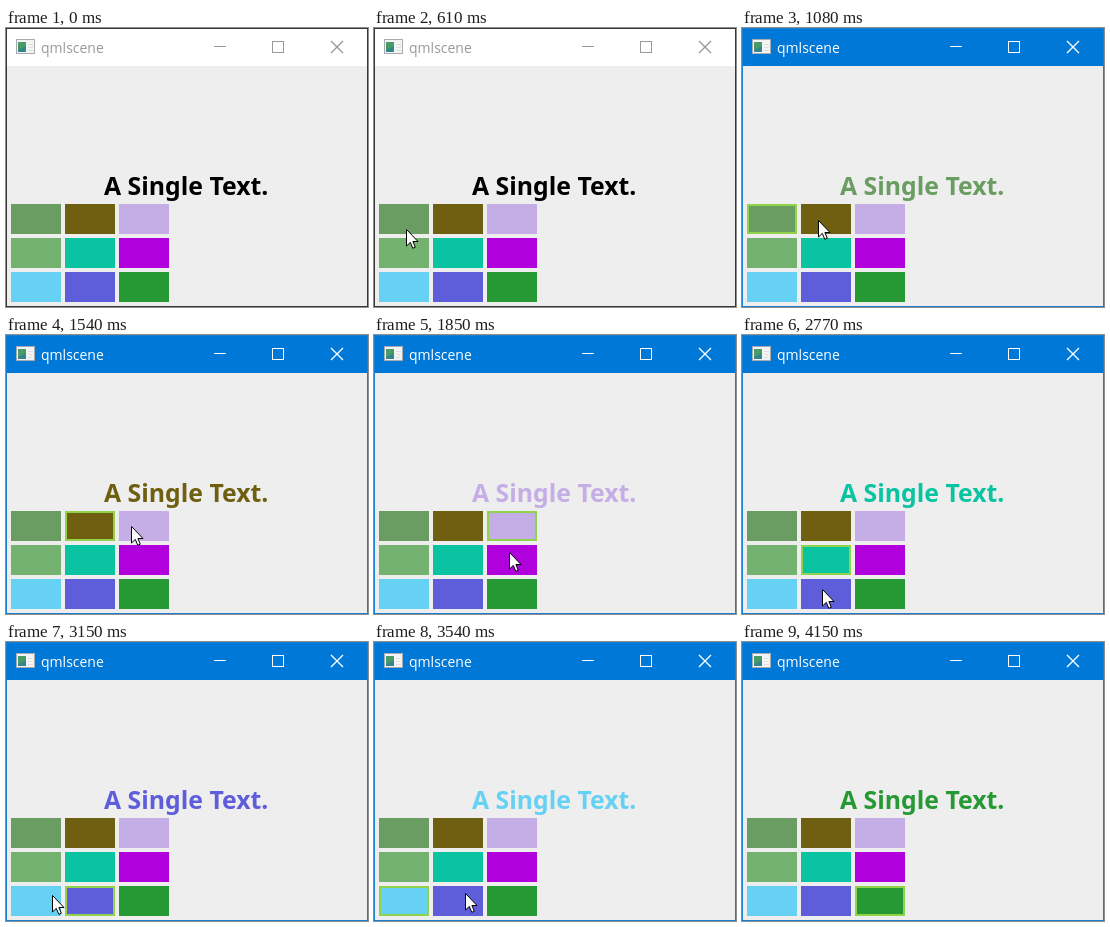
Write an HTML page that moves like this. It is 362 px wide and 279 px high and loops after 4.38 s.

```html
<!DOCTYPE html>
<html>
<head>
<meta charset="utf-8">
<style>
  html, body { margin: 0; height: 100%; overflow: hidden; background: #eee; }
  svg { display: block; }
  #window { --bar: #fff; --ink: #999; --edge: #383838; }
  #window.active { --bar: #0078d7; --ink: #fff; --edge: #1a7fd0; }
  #bar { fill: var(--bar); }
  #title { font: 14px "Open Sans", sans-serif; fill: var(--ink); }
  #buttons { fill: none; stroke: var(--ink); }
  #edge { fill: none; stroke: var(--edge); }
  #label { font: bold 24.8px "Noto Sans", sans-serif; text-anchor: middle; }
  #frame { fill: none; stroke: #90d34b; stroke-width: 2; }
</style>
</head>
<body>
<svg id="window" width="362" height="279">
  <rect width="362" height="279" fill="#eee"/>
  <rect id="bar" width="362" height="38"/>
  <g id="icon">
    <rect x="10.5" y="11.5" width="18" height="14" fill="#f4f4f4" stroke="#a5abb0"/>
    <rect x="12" y="14" width="8" height="10" fill="#35858c"/>
    <path d="M12 14h8v4l-8 4z" fill="#4a9b68"/>
    <path d="M22 16.5h5M22 19.5h5M22 22.5h5" stroke="#dde0e2"/>
  </g>
  <text id="title" x="35" y="25">qmlscene</text>
  <g id="buttons">
    <path d="M208 18.5h12"/>
    <rect x="266.5" y="13.5" width="11" height="11"/>
    <path d="M325 13l12 12m0-12l-12 12" stroke-width="1.4"/>
  </g>
  <rect id="edge" x=".5" y=".5" width="361" height="278"/>
  <text id="label" x="180.2" y="167">A Single Text.</text>
  <g id="tiles"></g>
  <rect id="frame" width="48" height="28"/>
  <path id="cursor" d="M.5 .5V17L4.3 13.4L6.8 19.3L9.3 18.2L6.9 12.5H12Z" fill="#fff" stroke="#000"/>
</svg>
<script>
const LOOP = 4380, STEP = LOOP / 57;
const LEFT = 5, TOP = 176, COLUMN = 54, ROW = 34;
const COLORS = ['#6a9d61', '#6f5f10', '#c5ade6', '#74b270', '#0ac4a1',
                '#b000dc', '#66d1f3', '#5e5edb', '#269834'];
const ACTIVATE = 9;
const CLICKS = [10, 16, 22, 27, 33, 38, 43, 51];

// Turning points of the pointer: [step, x, y]
const ROUTE = [
  [3, 46, 266], [9, 29, 188], [11, 29, 188], [14, 76, 192], [20, 125, 191],
  [25, 137, 223], [29, 91, 225], [32, 63, 227], [36, 80, 254], [43, 32, 252],
  [46, 91, 251], [49, 134, 247], [51, 134, 247], [54, 140, 280]
];
const ENTER = ROUTE[0][0], LEAVE = ROUTE[ROUTE.length - 1][0];

const $ = id => document.getElementById(id);
const tileX = i => LEFT + i % 3 * COLUMN;
const tileY = i => TOP + Math.floor(i / 3) * ROW;

$('tiles').innerHTML = COLORS.map((color, i) =>
  `<rect x="${tileX(i)}" y="${tileY(i)}" width="50" height="30" fill="${color}"/>`).join('');

function pointerAt(step) {
  const next = Math.max(1, ROUTE.findIndex(p => p[0] >= step));
  const [s0, x0, y0] = ROUTE[next - 1], [s1, x1, y1] = ROUTE[next];
  const f = (step - s0) / (s1 - s0);
  return [x0 + (x1 - x0) * f, y0 + (y1 - y0) * f].map(Math.round);
}

function tileUnderPointer(step) {
  const [x, y] = pointerAt(step);
  return Math.floor((x - LEFT) / COLUMN) + 3 * Math.floor((y - TOP) / ROW);
}

function draw(now) {
  // The screen only refreshes once per step.
  const step = Math.floor((now % LOOP + 11) / STEP);
  $('window').classList.toggle('active', step >= ACTIVATE);

  const click = CLICKS.filter(s => s <= step).pop();
  const tile = click ? tileUnderPointer(click) : -1;
  $('label').setAttribute('fill', COLORS[tile] || '#000');
  $('frame').style.display = click ? '' : 'none';
  $('frame').setAttribute('x', tileX(tile) + 1);
  $('frame').setAttribute('y', tileY(tile) + 1);

  const visible = step >= ENTER && step < LEAVE;
  $('cursor').style.display = visible ? '' : 'none';
  if (visible) $('cursor').setAttribute('transform', `translate(${pointerAt(step)})`);
  requestAnimationFrame(() => draw(performance.now()));
}
draw(0);
</script>
</body>
</html>
```
